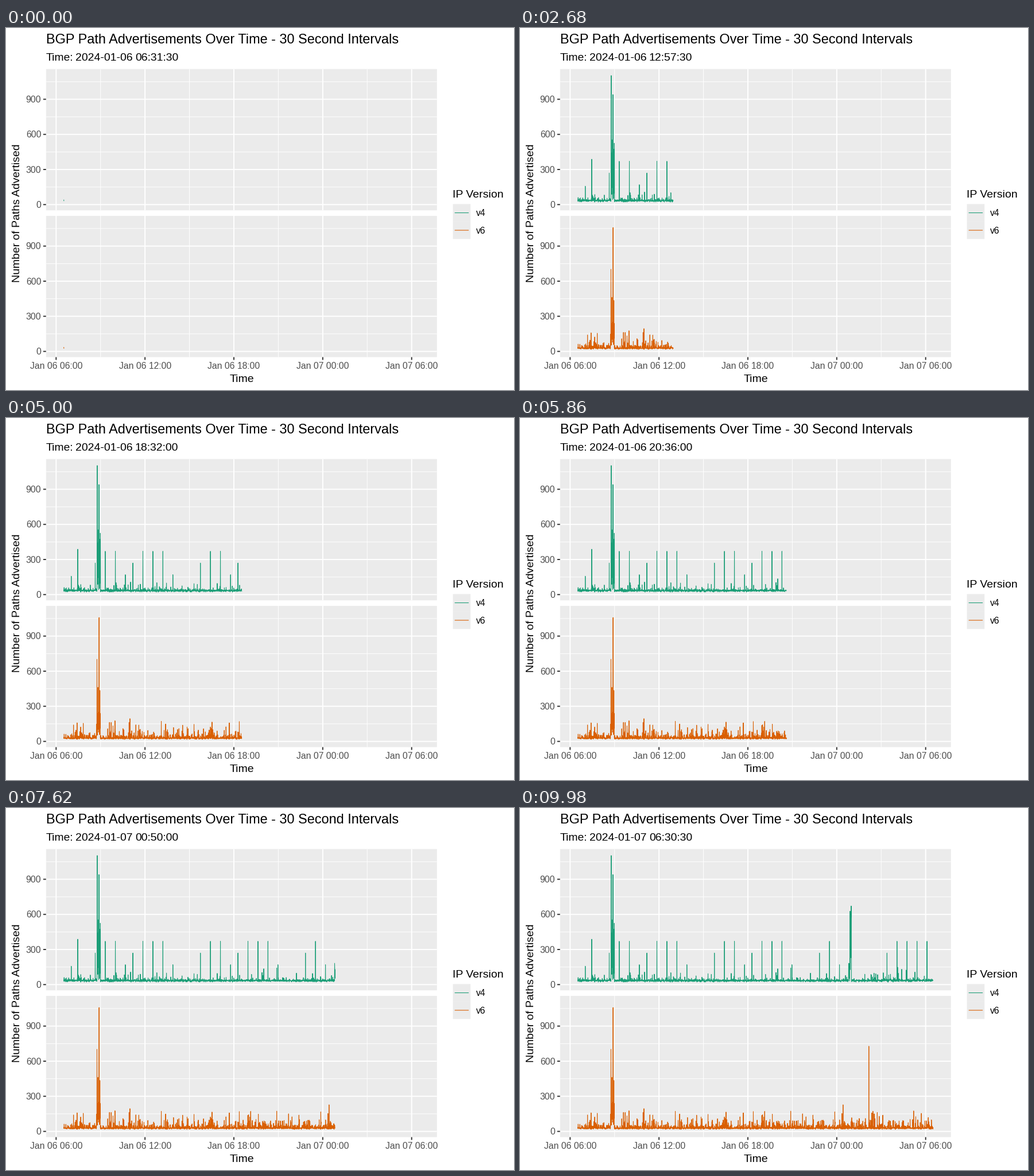
These frames come from a looping animation (885x632 px, 10000 ms). A matplotlib script:

```python
import matplotlib.pyplot as plt
import numpy as np
from matplotlib.animation import FuncAnimation
from matplotlib.patches import Rectangle

W, H, DPI = 885, 632, 100
FRAMES, INTERVAL = 500, 20
SAMPLES = 2880                      # one per 30 seconds
HOUR = 25.808                       # stage pixels per hour
X_SIX = 87.3                        # stage x of Jan 06 06:00
X_FIRST = X_SIX + HOUR * 31 / 60
DX = HOUR / 120
UNIT = 0.2043                       # stage pixels per path
LEFT, RIGHT = 69.8, 750.7
TOP, PANEL_H, PITCH = 71.7, 246.6, 256.3
ZERO = 308.3
GREEN, ORANGE = "#1B9E77", "#D95F02"
PANEL, GREY, TICK = "#EBEBEB", "#4D4D4D", "#333333"

plt.rcParams["font.family"] = "Liberation Sans"
plt.rcParams["path.simplify"] = False


def index(x):
    return int(round((x - X_FIRST) / DX))


def noise(rng, base, spread, tiers, calm=0):
    """Noisy floor plus random spikes, rarer in mid-series when calm > 0."""
    y = base + spread * np.clip(rng.normal(size=SAMPLES), -2.6, 2.6)
    activity = 1 - calm * np.sin(np.pi * np.linspace(0, 1, SAMPLES))
    for chance, low, high in tiers:
        hit = rng.random(SAMPLES) < chance * activity
        y += hit * rng.uniform(low, high, SAMPLES)
    return y


def burst(y, rng, x1, x2, low, high):
    a, b = index(x1), index(x2)
    y[a:b] = rng.uniform(low, high, b - a)


def peaks(y, points):
    for x, value in points:
        y[index(x)] = value


def beats(y, start, count, period=17.45):
    """Evenly spaced tall peaks with a weaker one on either side."""
    for i in range(-1, count + 1):
        k = index(start + i * period)
        if k < SAMPLES:
            y[k] = 270 if i < 0 else 170 if i == count else 370


rng = np.random.default_rng(4)
v4 = noise(rng, 34, 5, [(0.12, 5, 25), (0.035, 25, 70), (0.011, 60, 125)],
           calm=0.7)
burst(v4, rng, 158.8, 164.7, 30, 480)
burst(v4, rng, 572.5, 574.6, 30, 190)
burst(v4, rng, 574.6, 577.4, 30, 610)
for start, count in ((173, 2), (238.5, 3), (356.2, 2), (421.5, 3),
                     (539.2, 1), (656.8, 4)):
    beats(v4, start, count)
peaks(v4, [(125, 388), (159, 1103), (161, 555), (162, 940), (164.3, 525),
           (575, 628), (577, 672)])
v4[:2] = 42, 30

rng = np.random.default_rng(6)
v6 = noise(rng, 27, 4, [(0.2, 6, 28), (0.08, 25, 70), (0.016, 60, 150)])
burst(v6, rng, 158.2, 164.3, 24, 270)
peaks(v6, [(158.4, 702), (160.2, 462), (162.1, 1058), (163.6, 435),
           (607.7, 728)])
v6[:2] = 37, 24

fig = plt.figure(figsize=(W / DPI, H / DPI), dpi=DPI, facecolor="white")
ax = fig.add_axes([0, 0, 1, 1])
ax.set_xlim(0, W)
ax.set_ylim(H, 0)
ax.axis("off")


def px(size):
    return size * 72 / DPI


def label(x, y, text, size, color="black", ha="left", **kw):
    return ax.text(x, y, text, fontsize=px(size), color=color, ha=ha,
                   va="baseline", **kw)


def box(x, y, w, h):
    ax.add_patch(Rectangle((x, y), w, h, fc=PANEL, lw=0, snap=False, zorder=0))


def rules(draw, at, a, b, width, color, z):
    draw(at, a, b, colors=color, linewidths=px(width), zorder=z).set_snap(False)


major_x = X_SIX + HOUR * 6 * np.arange(5)
minor_x = major_x[:-1] + HOUR * 3
major_v = np.arange(0, 901, 300)

for top in (TOP, TOP + PITCH):
    bottom = top + PANEL_H
    zero = top + ZERO - TOP
    major_y = zero - UNIT * major_v
    box(LEFT, top, RIGHT - LEFT, PANEL_H)
    rules(ax.vlines, minor_x, top, bottom, 0.96, "white", 1)
    rules(ax.hlines, major_y - UNIT * 150, LEFT, RIGHT, 0.96, "white", 1)
    rules(ax.vlines, major_x, top, bottom, 1.93, "white", 2)
    rules(ax.hlines, major_y, LEFT, RIGHT, 1.93, "white", 2)
    rules(ax.hlines, major_y, LEFT - 4.9, LEFT, 1.93, TICK, 2)
    for v, y in zip(major_v, major_y):
        label(61.3, y + 5.7, str(v), 15.7, GREY, "right")

rules(ax.vlines, major_x, bottom, bottom + 4.9, 1.93, TICK, 2)
for i, x in enumerate(major_x):
    hour = 6 + 6 * i
    label(x, 595, f"Jan {6 + hour // 24:02d} {hour % 24:02d}:00", 15.7,
          GREY, "center")

label(70, 27, "BGP Path Advertisements Over Time - 30 Second Intervals", 23.55)
label(410.5, 618, "Time", 19.5, ha="center")
label(24.5, 323.5, "Number of Paths Advertised", 19.4, ha="center",
      rotation=90, rotation_mode="anchor")

label(778.5, 296, "IP Version", 19.5)
for y, name, color in ((322.6, "v4", GREEN), (353.1, "v6", ORANGE)):
    box(778.6, y - 15.25, 30.6, 30.5)
    rules(ax.hlines, [y], 781.7, 806.1, 1.1, color, 3)
    label(818.5, y + 5.7, name, 15.7)

label(70, 57, "Time:", 19.4)
date = label(121, 57, "", 19.4)
clock = label(225, 57, "", 19.4)

xs = X_FIRST + DX * np.arange(SAMPLES)
ys4 = ZERO - UNIT * v4
ys6 = ZERO + PITCH - UNIT * v6
style = dict(lw=px(1.05), solid_capstyle="butt", solid_joinstyle="round",
             zorder=3)
line4, = ax.plot([], [], color=GREEN, **style)
line6, = ax.plot([], [], color=ORANGE, **style)


def update(frame):
    step = frame * (SAMPLES - 2) // (FRAMES - 1)
    n = step + 2
    line4.set_data(xs[:n], ys4[:n])
    line6.set_data(xs[:n], ys6[:n])
    days, s = divmod(6 * 3600 + 31 * 60 + 30 + 30 * step, 86400)
    date.set_text(f"2024-01-{6 + days:02d}")
    clock.set_text(f"{s // 3600:02d}:{s // 60 % 60:02d}:{s % 60:02d}")
    return line4, line6, date, clock


anim = FuncAnimation(fig, update, frames=FRAMES, interval=INTERVAL,
                     repeat=True, cache_frame_data=False)
plt.show()
```
